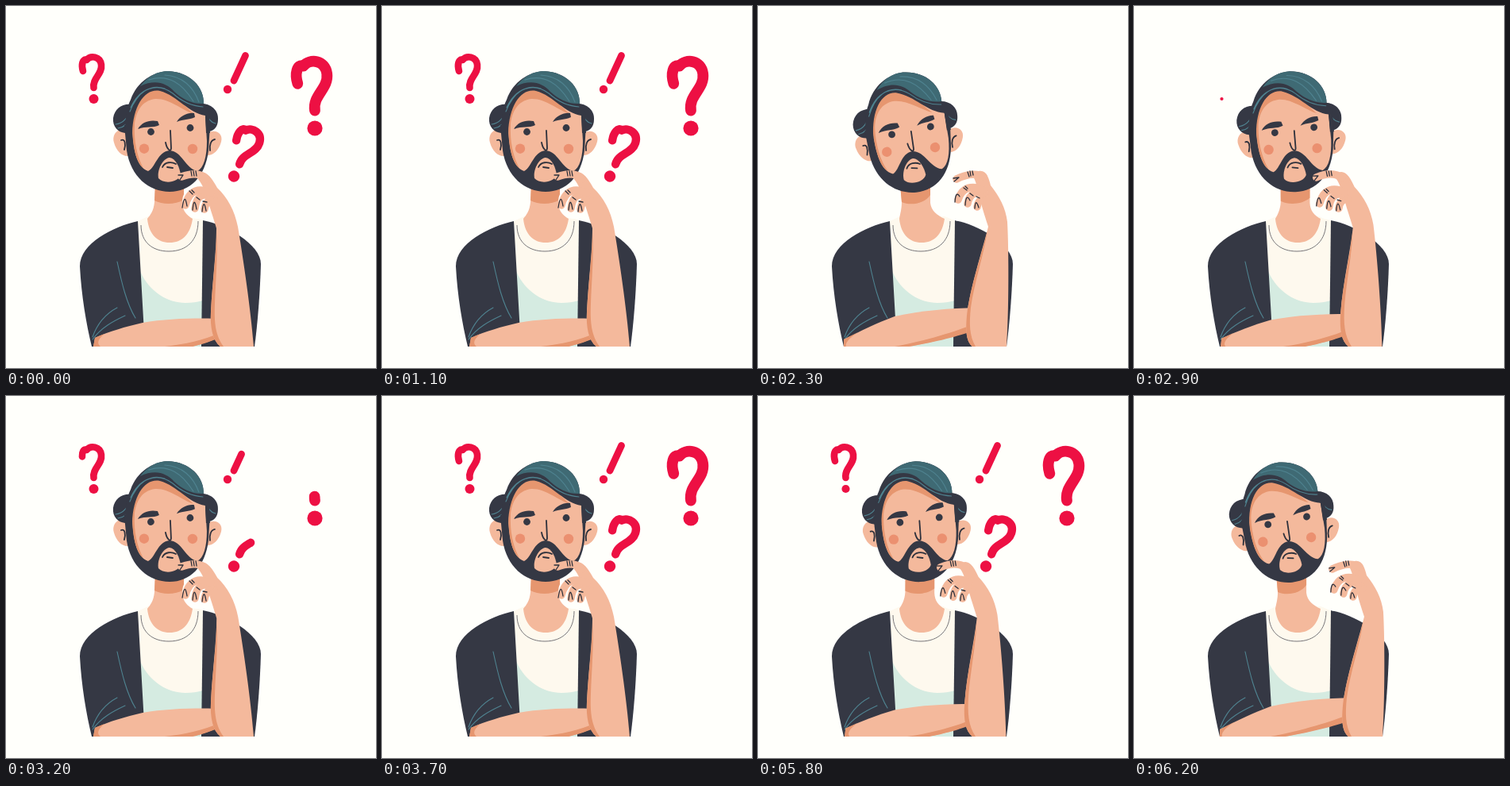
Write an HTML page that moves like this. It is 466 px wide and 456 px high and loops after 6300 ms.

```html
<!DOCTYPE html>
<html lang="en">
<head>
<meta charset="utf-8">
<title>Thinking man</title>
<style>
  html, body { margin: 0; width: 100%; height: 100%; overflow: hidden; background: #fffffb; }
  svg { display: block; width: 100vw; height: 100vh; }
  .ink { fill: #353844; }
  .skin { fill: #f4b99c; }
  .shade { fill: #e6966f; }
  .gap { fill: #fffffb; }
  .line { fill: none; stroke: #2d303b; stroke-width: 1.8; stroke-linecap: round; stroke-linejoin: round; }
  .thin { stroke-width: 1.3; }
  .strand { fill: none; stroke: #4f8390; stroke-width: 1.1; stroke-linecap: round; }
  .finger { fill: none; stroke: #f4b99c; stroke-width: 9.5; stroke-linecap: round; }
  .mark circle { fill: #ed1043; }
  .mark path { fill: none; stroke: #ed1043; stroke-linecap: round; stroke-linejoin: round; }
</style>
</head>
<body>
<svg viewBox="0 0 466 456" preserveAspectRatio="none">
  <g id="marks"></g>

  <g id="body">
    <path fill="#fef9ee" d="M166,271 L179,265 H235 L248,270 V429 H173Z"/>
    <path fill="#d5ebe1" d="M169,334 C180,360 204,374 226,374 Q238,374 248,371 V429 H173Z"/>
    <path class="ink" d="M166,271 C135,278 93,299 93,328 C95,365 101,400 108,429 H175 L173,394Z"/>
    <path class="ink" d="M248,270 C276,275 321,300 321,325 C320,360 317,400 313,429 H246Z"/>
    <path class="strand" d="M140,322 C146,350 152,375 163,393 M109,417 C115,400 125,388 140,380 M109,420 C120,405 135,397 150,390"/>
    <path fill="none" stroke="#77767a" d="M170,276 C170,298 185,309 205,309 C228,309 242,295 242,271"/>
  </g>

  <g id="neck"></g>

  <g id="head">
    <path class="skin" d="M152,157 C140,152 133,163 136,172 C139,183 147,190 154,189Z M254,160 C264,154 274,161 271,171 C268,182 261,188 254,188Z"/>
    <path class="line" d="M145,169 C150,167 151,174 149,181 M263,168 C258,169 256,175 257,182"/>
    <path class="ink" d="M160,124 C146,122 137,129 135,141 C134,152 141,159 150,160 H158Z M248,123 C260,124 268,133 267,143 C267,152 262,157 256,158 H248Z"/>
    <path class="strand" d="M138,149 C148,148 154,140 156,130 M141,154 C149,153 154,147 156,140 M264,148 C258,147 254,141 252,134"/>
    <path class="ink" d="M149,150 L152,182 C157,215 180,234 206,234 C232,234 251,215 255,182 L257,150Z"/>
    <path class="skin" d="M159,150 C157,128 165,110 182,105 C215,106 242,125 251,138 L253,170 C253,190 249,204 241,208 C226,205 222,183 206,182 C191,183 188,204 179,208 C164,203 160,180 159,150Z"/>
    <path class="shade" d="M159,150 C157,126 168,106 186,104 C205,104 222,122 236,136 C222,131 205,116 188,117 C170,119 163,135 162,150 C161,170 165,190 173,204 C162,196 159,170 159,150Z"/>
    <path class="skin" d="M206,191 C214,192 219,204 220,213 C217,222 199,225 192,217 C190,207 197,192 206,191Z"/>
    <path class="ink" d="M150,160 C150,140 152,128 157,118 C165,95 185,83 204,82 C232,83 250,102 249,124 L256,134 L257,160 H252 L251,138 C230,135 216,113 194,107 C176,103 160,124 159,160Z"/>
    <path fill="#3f6a74" d="M169,101 C179,88 191,82 204,82 C233,83 250,104 249,123 C235,124 222,117 212,108 C202,97 188,92 169,101Z"/>
    <path class="strand" d="M157,128 C168,104 190,95 210,110 C220,119 232,126 248,127 M156,133 C166,108 182,98 200,104 M180,93 C205,85 222,98 236,120 M200,87 C222,88 236,102 243,121"/>
    <path class="ink" d="M166,155 C171,146 181,143 191,145 L193,150 C185,154 177,151 166,155Z"/>
    <path id="brow" class="ink" d="M215,146 C220,138 229,134 237,135 L238,140 C230,144 224,142 215,146Z"/>
    <circle class="ink" cx="182.5" cy="158.5" r="4.4"/>
    <circle class="ink" cx="232" cy="153.5" r="4.4"/>
    <g fill="#eb9070">
      <circle cx="174" cy="179.7" r="6.2"/>
      <circle cx="235" cy="180" r="6.2"/>
    </g>
    <path class="line" d="M207,157 L208,179 C208,184 203,182 201,172 M197,203 C200,196 209,196 214,199 M203,203 L210,204"/>
  </g>

  <g id="arm"></g>
  <g id="hand"></g>
</svg>
<script>
const LOOP = 6300, CYCLE = 4000;
const el = id => document.getElementById(id);

function add(parent, tag, attrs) {
  const node = document.createElementNS("http://www.w3.org/2000/svg", tag);
  for (const k in attrs) node.setAttribute(k, attrs[k]);
  return parent.appendChild(node);
}

// Blend two path strings that share the same commands.
const number = /-?\d+(\.\d+)?/g;
function blend(a, b, p) {
  const ends = b.match(number);
  let i = 0;
  return a.replace(number, n => (+n + (ends[i++] - n) * p).toFixed(2));
}

// Each part: class, path with hand on chin, path with hand away.
const neckParts = [
  ["skin",
    "M188,225 L187,247 C186,258 182,263 178,268 C180,288 191,298 206,298 C222,298 232,288 235,268 C228,264 224,258 224,248 L224,225Z",
    "M179,225 L181,247 C181,256 179,262 178,268 C180,288 191,298 206,298 C222,298 232,288 235,268 C226,264 218,258 217,248 L217,225Z"],
  ["shade",
    "M188,225 L187,245 C198,251 214,250 224,244 L224,225Z",
    "M179,225 L181,247 C192,252 210,249 217,238 L217,225Z"]
];

const armParts = [
  ["skin",
    "M112,418 C130,410 150,404 172,399 C205,393 245,393 275,394 L275,415 C262,421 245,426 235,429 L110,429Z",
    "M108,420 C128,410 150,399 172,391 C210,383 240,381 275,380 L275,405 C250,416 215,425 190,429 L108,429Z"],
  ["shade",
    "M268,412 C250,421 225,426 200,429 L235,429 C245,427 262,421 268,418Z M112,418 L110,429 L119,429 C115,426 114,421 124,413Z",
    "M268,402 C245,412 200,424 172,429 L190,429 C215,425 250,417 268,410Z M108,420 L108,429 L111,429 C110,426 112,420 126,411Z"],
  ["gap",
    "M222,247 C222,235 230,226 241,226 C252,226 262,235 262,247 C262,259 252,268 241,268 C230,268 222,259 222,247Z",
    "M226,243 C226,227 240,215 256,215 C272,215 286,227 286,243 C286,259 272,271 256,271 C240,271 226,259 226,243Z"],
  ["skin",
    "M242,211 C250,206 258,214 266,229 C279,241 288,258 292,278 C299,320 308,380 312,429 L270,429 C260,421 257,405 258,385 C260,345 265,310 265,280 C261,266 257,255 252,238 C248,226 244,220 240,216Z",
    "M278,208 C288,206 291,218 293,226 C304,240 312,254 314,272 C316,310 316,385 313,429 L270,429 C263,423 261,412 263,390 C267,355 282,310 290,278 C287,268 283,258 279,240 C276,228 274,220 272,217Z"],
  ["shade",
    "M265,285 C265,315 260,345 258,385 C257,405 260,421 270,429 L274,429 C264,415 262,400 263,375 C264,345 267,315 265,285Z",
    "M289,283 C282,312 267,355 263,390 C261,412 263,423 270,429 L274,429 C266,415 266,400 268,380 C272,350 284,315 289,283Z"]
];

const handParts = [
  ["finger",
    "M262,244 C256,243 251,248 250,256",
    "M288,242 C281,241 277,246 276,253"],
  ["finger",
    "M258,240 C248,235 240,239 238,255",
    "M284,237 C275,232 266,237 264,249"],
  ["finger",
    "M258,236 C245,229 231,230 226,251",
    "M284,232 C270,225 257,228 252,244"],
  ["finger",
    "M221,215 C232,211 244,209 253,218",
    "M250,218 C262,212 275,210 284,215"],
  ["line thin",
    "M222,254 Q225,234 228,252 M235,257 Q237,238 240,256 M247,259 Q249,241 252,258 M217,213 L223,213 L219,219",
    "M248,247 Q249,232 254,240 M261,251 Q262,235 267,245 M273,255 Q274,241 278,254 M246,217 L253,216 L247,221"],
  ["line thin",
    "M233,208 L234,214 M236,208 L237,214 M239,208 L240,214 M231,233 L235,237 M234,232 L237,235 M240,241 L244,244 M248,246 L253,247",
    "M264,209 L266,215 M267,208 L268,214 M270,208 L271,213 M259,229 L263,232 M261,227 L264,230 M267,236 L271,239 M275,240 L279,242"]
];

const build = (id, parts) => parts.map(([cls, a, b]) =>
  ({ node: add(el(id), "path", { class: cls }), a, b }));
const neck = build("neck", neckParts);
const arm = build("arm", armParts);
const hand = build("hand", handParts);
const pose = (parts, p) => parts.forEach(s => s.node.setAttribute("d", blend(s.a, s.b, p)));

// Marks are drawn around their dot, the stem starting next to it.
const question = "M0,-14 C-2,-26 11,-31 9.5,-43 C8,-54 -4,-55 -9,-49 C-14,-51 -16,-43 -13.5,-35";
const marks = [
  ["translate(110.5 117)", question, 6, 8.6],
  ["translate(279 105)", "M8,-11 L22.5,-42.5", 5.2, 8.8],
  ["translate(287 214.5) rotate(25) scale(1.2)", question, 6, 8.6],
  ["translate(389 154) scale(1.6)", question, 6, 8.6]
].map(([transform, d, r, width]) => {
  const g = add(el("marks"), "g", { class: "mark", transform });
  return {
    r,
    dot: add(g, "circle", {}),
    stem: add(g, "path", { d, pathLength: 1, "stroke-width": width })
  };
});

const clamp = x => Math.max(0, Math.min(1, x));
const span = (t, start, length) => clamp((t - start) / length);
const ease = x => x < .5 ? 4 * x ** 3 : 1 - 4 * (1 - x) ** 3;
const away = (t, leave, back) => ease(span(t, leave, 875)) - ease(span(t, back, 875));

function drawMark(m, i, t) {
  const shown = 2855 + i * 60, gone = 1770 + i * 40;
  const leaving = t < 2500;
  const size = leaving ? 1 - span(t, gone, 200) : span(t, shown, 130);
  const from = leaving ? ease(span(t, gone + 70, 210)) : 0;
  const to = leaving ? 1 : ease(span(t, shown + 90, 350));
  m.dot.setAttribute("r", m.r * size);
  m.stem.setAttribute("visibility", to - from > .005 ? "visible" : "hidden");
  m.stem.setAttribute("stroke-dasharray", `0 ${from} ${to - from} 2`);
}

function draw(now) {
  const t = now % LOOP % CYCLE;
  const turn = away(t, 1450, 2420);
  el("head").setAttribute("transform", `rotate(${-5.7 * turn} 209.5 300)`);
  el("brow").setAttribute("transform", `translate(0 ${5 * away(t, 1650, 2750)})`);
  pose(neck, turn);
  pose(arm, away(t, 1385, 2442));
  pose(hand, away(t, 1432, 2394));
  marks.forEach((m, i) => drawMark(m, i, t));
}

const start = performance.now();
function tick() {
  draw(performance.now() - start);
  requestAnimationFrame(tick);
}
tick();
</script>
</body>
</html>
```
